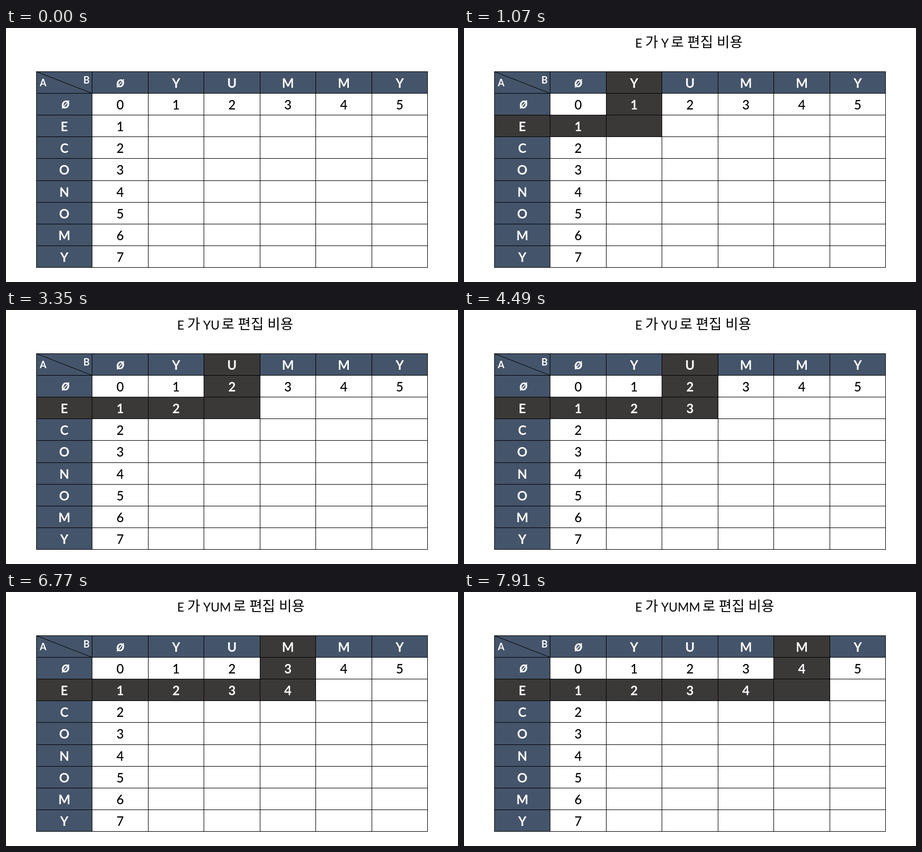
An HTML page for the animation above (8 s loop, 853 by 480 pixels).

```html
<!DOCTYPE html>
<html lang="ko">
<head>
<meta charset="utf-8">
<style>
  html, body { margin: 0; width: 100%; height: 100%; overflow: hidden; background: #fff; }
  svg { display: block; width: 100%; height: 100%; }
  text { font-family: Lato, sans-serif; font-size: 24px; }
  .cell { text-anchor: middle; font-weight: 500; }
  .light { fill: #fff; font-weight: 700; }
  .empty { font: italic 600 22px "Noto Sans", sans-serif; }
  .corner { font-size: 18px; }
  .latin { font-size: 23px; }
  .hangul { font-family: "Noto Sans CJK KR", "Noto Sans CJK", sans-serif; font-size: 26.5px; }
  path { stroke: #000; fill: none; }
</style>
</head>
<body>
<svg id="stage" viewBox="0 0 853 480"></svg>
<script>
const LOOP = 8000, FIRST_STEP = 1070, STEP = 1140;
const COLUMNS = "ØYUMMY", ROWS = "ØECONOMY";
const HEADER = "#44546a", DARK = "#3b3838";
const stage = document.getElementById("stage");

const lineX = i => Math.round(57 + 105.43 * i) + 0.5;
const lineY = j => Math.round(81.7 + 41.17 * j) + 0.5;
const text = (x, y, cls, s) => `<text x="${x}" y="${y}" class="${cls}">${s}</text>`;

// Grid position 0 is the header; position 1 belongs to the empty string.
function cell(col, row, active, filled) {
  const header = col === 0 || row === 0;
  const dark = active > 0 && (
    (row === 2 && col <= active + 1) || (col === active + 1 && row < 2));
  const fill = dark ? DARK : header ? HEADER : "#fff";
  const x = lineX(col), y = lineY(row);
  const w = lineX(col + 1) - x, h = lineY(row + 1) - y;

  let label = "";
  if (row === 0) label = col ? COLUMNS[col - 1] : "";
  else if (col === 0) label = ROWS[row - 1];
  else if (row === 1 || col === 1 || (row === 2 && col <= filled + 1)) label = col + row - 2;
  if (row === 2 && col > 1 && label !== "") label = col;

  const empty = label === "Ø";
  const cls = "cell" + (header || dark ? " light" : "") + (empty ? " empty" : "");
  const dx = empty && col === 0 ? 2 : 0;
  const dy = empty ? (col === 0 ? 28.3 : 29.3) : 30;
  return `<rect x="${x}" y="${y}" width="${w}" height="${h}" fill="${fill}"/>` +
    text(x + w / 2 + dx, y + dy, cls, label);
}

function title(length) {
  if (!length) return "";
  const shift = [0, 16.3, 37.9, 59.5][length - 1];
  return text(323, 36.5, "latin", "E") +
    text(342, 36, "hangul", "가") +
    text(372, 36.5, "latin", COLUMNS.slice(1, length + 1)) +
    text(390.5 + shift, 36, "hangul", "로") +
    text(421.3 + shift, 36, "hangul", "편집") +
    text(477 + shift, 36, "hangul", "비용");
}

function gridLines() {
  let d = `M${lineX(0)} ${lineY(0)}L${lineX(1)} ${lineY(1)}`;
  for (let i = 0; i <= 7; i++) d += `M${lineX(i)} ${lineY(0) - 0.5}V${lineY(9) + 0.5}`;
  for (let j = 0; j <= 9; j++) d += `M${lineX(0) - 0.5} ${lineY(j)}H${lineX(7) + 0.5}`;
  return `<path d="${d}"/>`;
}

function render(step) {
  const active = Math.ceil(step / 2), filled = Math.floor(step / 2);
  let svg = title(active);
  for (let row = 0; row < 9; row++)
    for (let col = 0; col < 7; col++) svg += cell(col, row, active, filled);
  svg += gridLines();
  svg += text(70, 110, "cell light corner", "A") + text(152, 105, "cell light corner", "B");
  stage.innerHTML = svg;
}

let shown = -1;
const start = performance.now();
function tick() {
  const t = (performance.now() - start) % LOOP;
  const step = Math.max(0, Math.floor((t - FIRST_STEP) / STEP) + 1);
  if (step !== shown) render(shown = step);
  requestAnimationFrame(tick);
}
tick();
</script>
</body>
</html>
```
